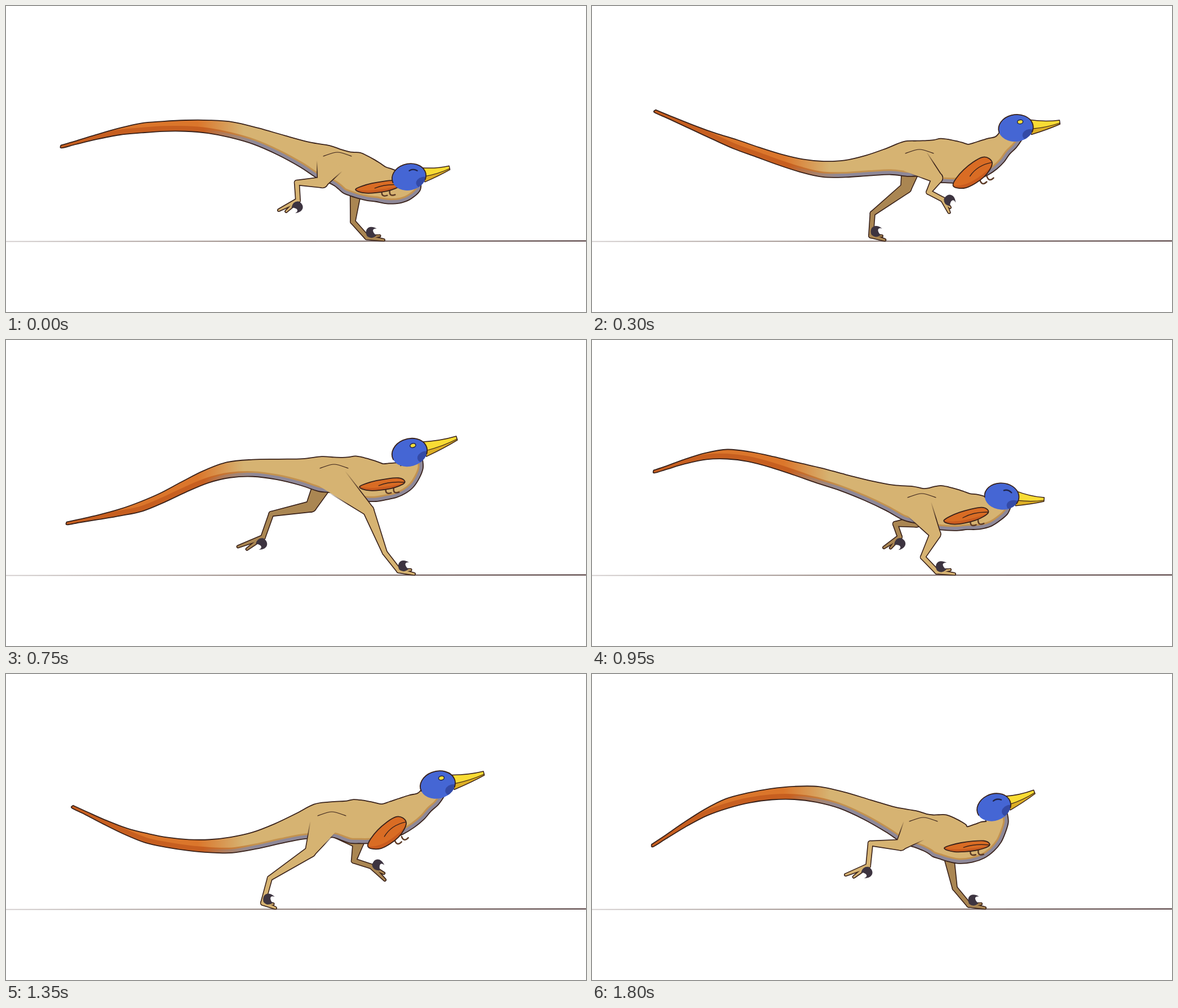
Recreate the animation shown at these times as an HTML page with a canvas. Size 1029x544 px, loop 1.85 s.

```html
<!DOCTYPE html>
<html lang="en">
<head>
<meta charset="utf-8">
<title>Running raptor</title>
<style>
html, body { margin: 0; width: 100%; height: 100%; overflow: hidden; background: #fff; }
canvas { display: block; }
</style>
</head>
<body>
<canvas id="stage" width="1029" height="544"></canvas>
<script>
const ctx = document.getElementById('stage').getContext('2d');
const INK = '#38211a', TAN = '#d6b372', FAR_TAN = '#aa8652', CLAW = '#3d3440';
const LOOP = 1850, STRIDE = 12;
// Exposure of each drawing in units of 50 ms; the loop holds two strides.
const holds = '121221212121122222112121';

const pairs = v => Array.from({ length: v.length / 2 }, (_, i) => [v[2 * i], v[2 * i + 1]]);
const key = (phase, ...v) => ({ phase, pts: pairs(v) });

// Key poses of the spine: tail tip, two tail points, hip, chest, neck, head, beak tip.
const spineKeys = [
  key(0, 98,250, 240,217, 400,220, 563,277, 665,317, 712,324, 715,304, 787,288),
  key(1, 110,234, 240,203, 403,241, 560,290, 668,305, 715,303, 727,278, 802,284),
  key(4, 112,187, 255,246, 410,290, 556,272, 675,277, 728,248, 752,217, 830,207),
  key(5, 118,236, 250,292, 400,304, 553,262, 675,262, 742,228, 766,197, 848,177),
  key(6, 108,275, 235,309, 395,293, 555,243, 690,230, 775,175, 832,120, 913,99),
  key(8, 103,331, 240,336, 395,279, 560,222, 680,205, 735,190, 746,152, 850,123),
  key(10, 108,326, 240,296, 395,231, 557,238, 672,252, 717,234, 716,200, 800,175),
  key(11, 107,305, 240,230, 400,214, 563,272, 670,303, 716,272, 713,237, 785,210),
];
// Half-widths along the spine, with the belly between hip and chest.
const girth = [2.5, 8.5, 14, 31, 39, 32, 20, 20];

// Key poses of a leg over both strides: knee, ankle, foot, toe.
const legKeys = [
  key(1, 609,345, 587,386, 612,412, 643,416),
  key(5, 540,316, 468,363, 456,407, 478,416),
  key(8, 528,280, 424,325, 388,370, 335,388),
  key(11, 548,304, 494,301, 490,341, 450,357),
  key(13, 575,323, 538,327, 546,350, 518,369),
  key(17, 625,300, 617,332, 648,342, 672,366),
  key(20, 680,240, 658,299, 690,283, 730,265),
  key(22, 643,303, 672,378, 697,410, 724,416),
];

const lerp = (a, b, u) => a + (b - a) * u;
const mix = (a, b, u) => [lerp(a[0], b[0], u), lerp(a[1], b[1], u)];
const shift = (p, dx, dy) => [p[0] + dx, p[1] + dy];
const heading = (a, b) => Math.atan2(b[1] - a[1], b[0] - a[0]);
const dist = (a, b) => Math.hypot(b[0] - a[0], b[1] - a[1]);
const polar = (p, r, angle) => shift(p, r * Math.cos(angle), r * Math.sin(angle));

function sample(keys, phase, period) {
  const i = keys.findLastIndex(k => k.phase <= phase);
  const a = keys.at(i), b = keys[(i + 1) % keys.length];
  const since = (from, to) => (to - from + period) % period;
  const u = since(a.phase, phase) / since(a.phase, b.phase);
  return a.pts.map((p, k) => mix(p, b.pts[k], u));
}

// Catmull-Rom through the points, as Bezier pieces.
function pieces(pts, closed) {
  const n = pts.length;
  const at = i => closed ? pts[(i + n) % n] : pts[Math.max(0, Math.min(n - 1, i))];
  return Array.from({ length: closed ? n : n - 1 }, (_, i) => {
    const [p, a, b, q] = [at(i - 1), at(i), at(i + 1), at(i + 2)];
    return [a, shift(a, (b[0] - p[0]) / 6, (b[1] - p[1]) / 6),
      shift(b, (a[0] - q[0]) / 6, (a[1] - q[1]) / 6), b];
  });
}

function spline(pts, closed) {
  const path = new Path2D();
  path.moveTo(...pts[0]);
  pieces(pts, closed).forEach(([, c, d, b]) => path.bezierCurveTo(...c, ...d, ...b));
  return path;
}

function bezierPoint([a, b, c, d], u) {
  const bc = mix(b, c, u);
  return mix(mix(mix(a, b, u), bc, u), mix(bc, mix(c, d, u), u), u);
}

// Offsets the spine by its girth to both sides.
function outline(spine) {
  const mids = [], back = [], under = [], STEPS = 4;
  pieces(spine).forEach((piece, i) => {
    for (let k = 0; k < STEPS; k++) {
      const u = k / STEPS;
      mids.push([bezierPoint(piece, u), lerp(girth[i], girth[i + 1], u * u)]);
    }
  });
  mids.push([spine.at(-1), girth.at(-1)]);
  mids.forEach(([p, r], i) => {
    const [before] = mids[Math.max(0, i - 1)], [after] = mids[Math.min(mids.length - 1, i + 1)];
    const angle = heading(before, after);
    back.push(polar(p, r, angle - Math.PI / 2));
    under.unshift(polar(p, r, angle + Math.PI / 2));
  });
  return { back, under };
}

function fade(from, to, ...stops) {
  const g = ctx.createLinearGradient(...from, ...to);
  stops.forEach(([at, color]) => g.addColorStop(at, color));
  return g;
}

function stroke(path, color = INK, width = 1.8) {
  ctx.strokeStyle = color;
  ctx.lineWidth = width;
  ctx.stroke(path);
}

function fill(path, color) {
  ctx.fillStyle = color;
  ctx.fill(path);
}

function inside(path, paint) {
  ctx.save();
  ctx.clip(path);
  paint();
  ctx.restore();
}

function placed(at, angle, paint) {
  ctx.save();
  ctx.translate(...at);
  ctx.rotate(angle);
  paint();
  ctx.restore();
}

function oval(x, y, rx, ry, from = 0, to = 2 * Math.PI) {
  const path = new Path2D();
  path.ellipse(x, y, rx, ry, 0, from, to);
  return path;
}

function taper(a, ra, b, rb, roundStart = true) {
  const side = heading(a, b) + Math.PI / 2, path = new Path2D();
  path.moveTo(...polar(a, ra, side));
  path.arc(...b, rb, side, side - Math.PI, true);
  path.lineTo(...polar(a, -ra, side));
  if (roundStart) path.arc(...a, ra, side - Math.PI, side - 2 * Math.PI, true);
  return path;
}

function drawLeg(hip, phase, color, near) {
  const [knee, ankle, foot, toe] = sample(legKeys, phase, 2 * STRIDE);
  const angle = heading(foot, toe);
  const sideToe = polar(foot, dist(foot, toe) * .75, angle - .28);
  const thigh = taper(hip, near ? 27 : 19, knee, 9, false);
  const parts = [taper(knee, 9, ankle, 3.6), taper(ankle, 3.6, foot, 3.4),
    taper(foot, 3.4, toe, 1.5), taper(foot, 3, sideToe, 1.3)];
  stroke(thigh, near ? fade(hip, knee, [.2, INK + '00'], [.65, INK]) : INK, 3.2);
  parts.forEach(p => stroke(p, INK, 3.2));
  [thigh, ...parts].forEach(p => fill(p, color));
  placed(foot, angle, () => fill(new Path2D('M0-2C-8-13 0-24 15-18C7-18 6-12 16-6Q9 3 0-2'), CLAW));
}

function drawBody({ back, under }) {
  const body = spline([...back, ...under, back[0]]), belly = spline(under);
  const across = [[0, 0], [1029, 0]];
  fill(body, fade(...across, [.33, '#db762b'], [.41, TAN]));
  inside(body, () => {
    stroke(belly, fade(...across, [.34, '#c75f20'], [.43, '#c3924f']), 19);
    stroke(belly, fade(...across, [.34, '#8e889800'], [.43, '#8e8898']), 13);
  });
  stroke(body);
}

function drawWing(shoulder, phase) {
  const swing = Math.cos(2 * Math.PI * (phase - 5) / STRIDE);
  const h = 15 + 5 * swing;
  placed(shoulder, -.3 - .25 * swing, () => {
    for (const x of [-34, -20]) {
      stroke(new Path2D(`M${x} ${h - 3}q-2 11 9 8`), '#5b3a26', 2.5);
    }
    const wing = spline([[0, 0], [-10, -h * .9], [-50, -h * .75], [-80, 0], [-62, h * .8], [-25, h * .75]], true);
    fill(wing, '#d96c24');
    inside(wing, () => stroke(new Path2D(`M-84 2Q-60 ${h * 1.2} 0 ${h * .4}`), '#c95b1f', 7));
    stroke(wing);
    stroke(new Path2D(`M0-1Q-25 ${-h * .5}-46 1`), INK, 1.4);
  });
}

function drawHead(centre, tip, eyeOpen) {
  const beakLength = dist(centre, tip), size = .75 + beakLength / 320;
  placed(centre, heading(centre, tip), () => {
    ctx.scale(size, size);
    const len = beakLength / size;
    const lip = `M28 5Q${len * .7} 6 ${len} 1`;
    const beak = new Path2D(`M24-12Q${len * .65}-4 ${len}-4L${len} 3Q${len * .7} 10 26 15Z`);
    fill(beak, '#f9dc34');
    inside(beak, () => fill(new Path2D(lip + 'V20H20Z'), '#dcae25'));
    stroke(beak, INK, 1.5);
    stroke(new Path2D(lip), INK, 1.2);

    const skull = oval(0, 0, 31, 24);
    fill(skull, '#4566d4');
    inside(skull, () => fill(oval(23, 15, 13, 10), '#344aa6'));
    stroke(oval(0, 0, 31, 24, Math.PI * .95, Math.PI * 2.15));

    if (eyeOpen) {
      const eye = oval(9, -10, 5, 3.6);
      fill(eye, '#f5dd3a');
      stroke(eye, '#20244a', 1.5);
    } else {
      stroke(new Path2D('M3-11Q10-14 17-8'), '#20244a', 2.4);
    }
  });
}

function draw(n) {
  const phase = n % STRIDE;
  const [tip, tail, root, hip, chest, neck, head, beak] = sample(spineKeys, phase, STRIDE);
  const spine = [tip, tail, root, hip, mix(hip, chest, .5), chest, neck, head];
  const thighTop = shift(hip, 14, 0);

  ctx.fillStyle = '#fff';
  ctx.fillRect(0, 0, 1029, 544);
  ctx.lineJoin = ctx.lineCap = 'round';
  stroke(new Path2D('M0 418.6L1029 417.6'),
    fade([0, 0], [1029, 0], [0, '#d2cdcd'], [.4, '#8c7b75'], [1, '#33191a']));

  drawLeg(thighTop, n, FAR_TAN, false);
  drawBody(outline(spine));
  drawLeg(thighTop, (n + STRIDE) % (2 * STRIDE), TAN, true);
  stroke(spline([shift(hip, 0, -10), shift(hip, 25, -17), shift(hip, 50, -10)]), INK, 1.2);
  drawWing(shift(chest, 35, 2), phase);
  // The eyes shut around each landing.
  drawHead(head, beak, n > 1 && n < 19 && Math.abs(n - STRIDE) > 1);
}

function drawingAt(ms) {
  let n = 0;
  for (let end = holds[0] * 50; end <= ms; end += holds[n] * 50) n++;
  return n;
}

function tick() {
  draw(drawingAt(performance.now() % LOOP));
  requestAnimationFrame(tick);
}
tick();
</script>
</body>
</html>
```
